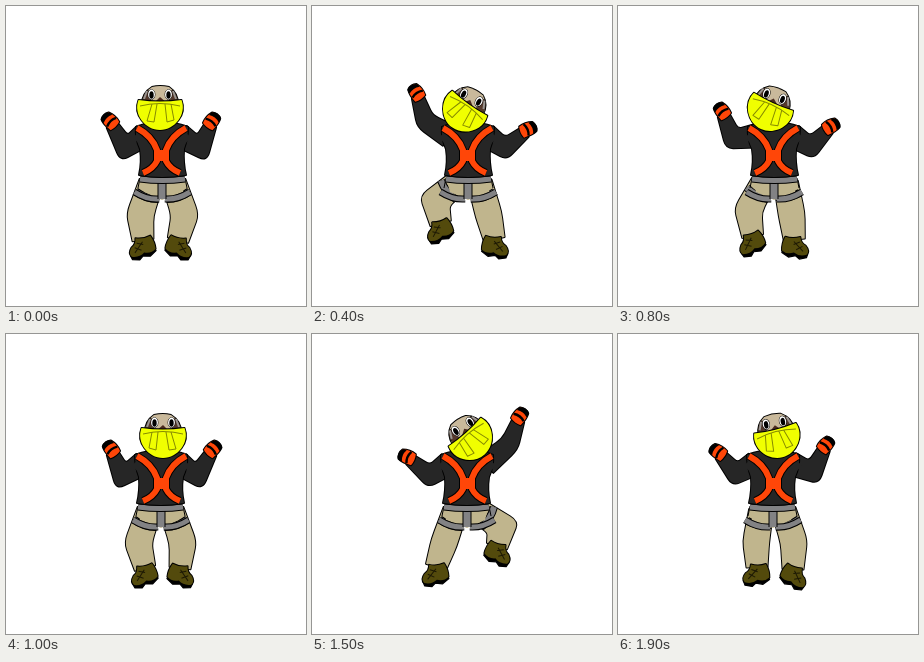
These frames come from a looping animation (300 by 300 pixels, 2 s). An HTML page with a canvas:

```html
<!DOCTYPE html>
<html lang="en">
<head>
<meta charset="utf-8">
<title>Climber</title>
<style>
html, body { margin: 0; width: 100%; height: 100%; overflow: hidden; background: #fff; }
canvas { display: block; width: 300px; height: 300px; }
</style>
</head>
<body>
<canvas id="stage" width="300" height="300"></canvas>
<script>
const ctx = document.getElementById('stage').getContext('2d');
const INK = '#000', SHIRT = '#262626', PANTS = '#c0b58d', STRAP = '#828284',
      ORANGE = '#ff4608', YELLOW = '#f0ff00', BOOT = '#534a0c';
const LOOP = 2000, HALF = 1000, STEP = 100, MIRROR = 311;

// head: x, y, tilt; arms: elbow, hand; legs: knee, foot, foot tilt.
// The reaching side comes first; the second half of the loop is mirrored.
const neutral = { at: 0, head: [154, 102, 0],
  reach: [118, 142, 104, 115], rest: [196, 142, 206, 115],
  lift: [134, 209, 136, 242, -14], stand: [179, 209, 173, 242, 16] };
const poses = [
  neutral,
  { at: 200, head: [153.5, 103, 18],
    reach: [113, 125, 107, 96], rest: [194, 143, 216, 124],
    lift: [128, 199, 133, 236, -20], stand: [172, 208, 174, 242, 5] },
  { at: 500, head: [153, 104, 32],
    reach: [113, 110, 103, 82], rest: [194, 142, 216, 123],
    lift: [120, 193, 125, 220, -20], stand: [179, 209, 188, 241, 10] },
  { at: 600, head: [152.5, 105, 35],
    reach: [112, 122, 106, 93], rest: [194, 143, 217, 125],
    lift: [120, 197, 131, 228, -22], stand: [175, 209, 186, 243, 4] },
  { at: 900, head: [152, 102, 11],
    reach: [115, 138, 103, 111], rest: [194, 140, 211, 118],
    lift: [135, 208, 135, 243, -23], stand: [173, 208, 173, 241, 6] },
  { ...neutral, at: HALF, head: [157, 102, 0] }
];

const mix = (a, b, k) => a + (b - a) * k;
const between = (p, q, k) => [mix(p[0], q[0], k), mix(p[1], q[1], k)];

function poseAt(time) {
  const i = poses.findIndex(p => p.at > time);
  const a = poses[i - 1], b = poses[i], k = (time - a.at) / (b.at - a.at);
  const pose = {};
  for (const part of ['head', 'reach', 'rest', 'lift', 'stand'])
    pose[part] = a[part].map((v, n) => mix(v, b[part][n], k));
  return pose;
}

function paint(path, fill, line = 1) {
  const p = typeof path === 'string' ? new Path2D(path) : path;
  if (line) {
    ctx.strokeStyle = INK;
    ctx.lineWidth = line * 2;
    ctx.stroke(p);
  }
  ctx.fillStyle = fill;
  ctx.fill(p);
}

function trace(path, color, width) {
  ctx.strokeStyle = color;
  ctx.lineWidth = width;
  ctx.stroke(new Path2D(path));
}

function strap(path, color, width) {
  trace(path, INK, width + 2);
  trace(path, color, width);
}

function ellipse(x, y, rx, ry, fill, line = 0) {
  const p = new Path2D();
  p.ellipse(x, y, rx, ry, 0, 0, 7);
  paint(p, fill, line);
}

function local(x, y, angle, flip, draw) {
  ctx.save();
  ctx.translate(x, y);
  ctx.rotate(angle);
  if (flip) ctx.scale(-1, 1);
  draw();
  ctx.restore();
}

// Two tapered segments with a mitred, slightly rounded middle joint.
function limb(a, b, c, widths, fill) {
  const upper = Math.atan2(b[1] - a[1], b[0] - a[0]);
  const lower = Math.atan2(c[1] - b[1], c[0] - b[0]);
  const bend = Math.atan2(Math.sin(lower - upper), Math.cos(lower - upper)) / 2;
  const miter = Math.min(1.8, 1 / Math.cos(bend));
  const edge = ([x, y], dir, r) => [x - Math.sin(dir) * r, y + Math.cos(dir) * r];
  const side = s => [edge(a, upper, s * widths[0] / 2),
                     edge(b, upper + bend, s * widths[1] / 2 * miter),
                     edge(c, lower, s * widths[2] / 2)];
  const curve = ([p, q, r]) => `${p}L${between(p, q, 0.75)}Q${q} ${between(q, r, 0.25)}L${r}`;
  paint(`M${curve(side(1))}L${curve(side(-1).reverse())}Z`, fill);
}

function boot(x, y, tilt, flip) {
  local(x, y, tilt * Math.PI / 180, flip, () => {
    paint('M-13 5L-12 9L-5 11L-1 8L6 10L13 6L12 3Z', INK, 0.6);
    paint('M-4 -11Q4 -8 11 -10Q14 -3 13 4Q8 8 1 5Q-5 9 -12 6Q-15 2 -10 -3Q-5 -5 -4 -11Z', BOOT);
    trace('M-7 -2L-1 2M-4 -6L2 -3M-8 3L2 -6', '#1c1804', 1);
  });
}

function leg(hip, [kx, ky, fx, fy, tilt], flip) {
  const knee = [kx, ky];
  limb(hip, knee, [fx + (flip ? -1 : 1), fy - 8], [24, 26, 21], PANTS);
  const angle = Math.atan2(ky - hip[1], kx - hip[0]);
  local(...between(hip, knee, 0.38), angle, false, () => strap('M0 -12Q4 0 0 12', STRAP, 6));
  boot(fx, fy, tilt, flip);
}

function arm(shoulder, [ex, ey, hx, hy], flip) {
  limb(shoulder, [ex, ey], between([ex, ey], [hx, hy], 0.85), [23, 18, 12], SHIRT);
  const angle = Math.atan2(hx - ex, ey - hy) + (flip ? 0.3 : -0.3);
  local(hx, hy, angle, flip, () => {
    paint('M-6 7Q-7 -2 -5 -7Q0 -10 5 -7Q8 0 6 7Q0 9 -6 7Z', ORANGE);
    paint('M-6 -3Q-7 -8 -3 -9Q3 -10 6 -6L6 -3Q0 -6 -6 -3Z', INK, 0);
    trace('M-6 2Q0 -1 6.5 2', INK, 2.4);
  });
}

function torso() {
  paint('M130 121Q155 111 182 121Q182 132 178 143Q177 157 180 169Q156 173 133 169Q136 156 134 143Q129 132 130 121Z', SHIRT);
  // Cover the seams between sleeves and torso.
  trace('M132 127L138 134M180 127L174 134', SHIRT, 13);
}

function harness() {
  const half = 'M131 122Q146 130 151 144L151 155Q147 163 137 167';
  for (const flip of [false, true])
    local(flip ? 311 : 0, 0, 0, flip, () => strap(half, ORANGE, 6));
  paint('M150 144L161 144L161 155L150 155Z', ORANGE, 0);
}

function belt() {
  paint('M134 172L179 172L177 186L156 194L138 186Z', PANTS, 0);
  trace('M134 172L132 182M179 172L181 182', INK, 1);
  strap('M128.5 186Q141 194 153 193M184 186Q171 194 159 193', STRAP, 5);
  strap('M156 176L156 193', STRAP, 7);
  strap('M134 173Q156 176 179 173', STRAP, 5);
}

function head([x, y, tilt]) {
  local(x, y, tilt * Math.PI / 180, false, () => {
    paint('M-18 -4Q-18 -15 -8 -21Q0 -23 9 -21Q18 -15 18 -4Z', '#c9b99b');
    for (const side of [-1, 1]) {
      local(0, 0, 0, side < 0, () => {
        paint('M9 -5L12 -18Q18 -13 17 -5Z', '#55392c', 0.4);
        trace('M13 -17L16 -9', '#9a9692', 2);
        ellipse(8.5, -13.5, 3.4, 5, '#fff', 0.5);
        ellipse(8.5, -13, 2.2, 3.8, INK);
      });
    }
    paint('M-6 -5L0 -11L7 -5Z', '#4a2a1e', 0);
    ctx.rotate(tilt * 0.3 * Math.PI / 180);
    paint('M-21.5 -8Q0 -5 21.5 -8C27 6 15 22 0 22C-15 22 -27 6 -21.5 -8Z', YELLOW);
    trace('M-20 -2Q0 -7 20 -2M-8 -4L-13 13L-6 14L-3 -4M5 -4L7 14L14 12L11 -4', '#858a00', 1);
  });
}

function draw(time) {
  const pose = poseAt(time % HALF);
  ctx.clearRect(0, 0, 300, 300);
  ctx.save();
  if (time >= HALF) {
    ctx.translate(MIRROR, 0);
    ctx.scale(-1, 1);
  }
  ctx.lineJoin = 'round';
  const hips = [[145, 177], [168, 177]];
  leg(hips[1], pose.stand, true);
  leg(hips[0], pose.lift, false);
  belt();
  arm([137, 130], pose.reach, false);
  arm([175, 130], pose.rest, true);
  torso();
  harness();
  head(pose.head);
  ctx.restore();
}

const start = performance.now();
function tick() {
  const time = (performance.now() - start) % LOOP;
  draw(Math.floor(time / STEP) * STEP);
  requestAnimationFrame(tick);
}
tick();
</script>
</body>
</html>
```
